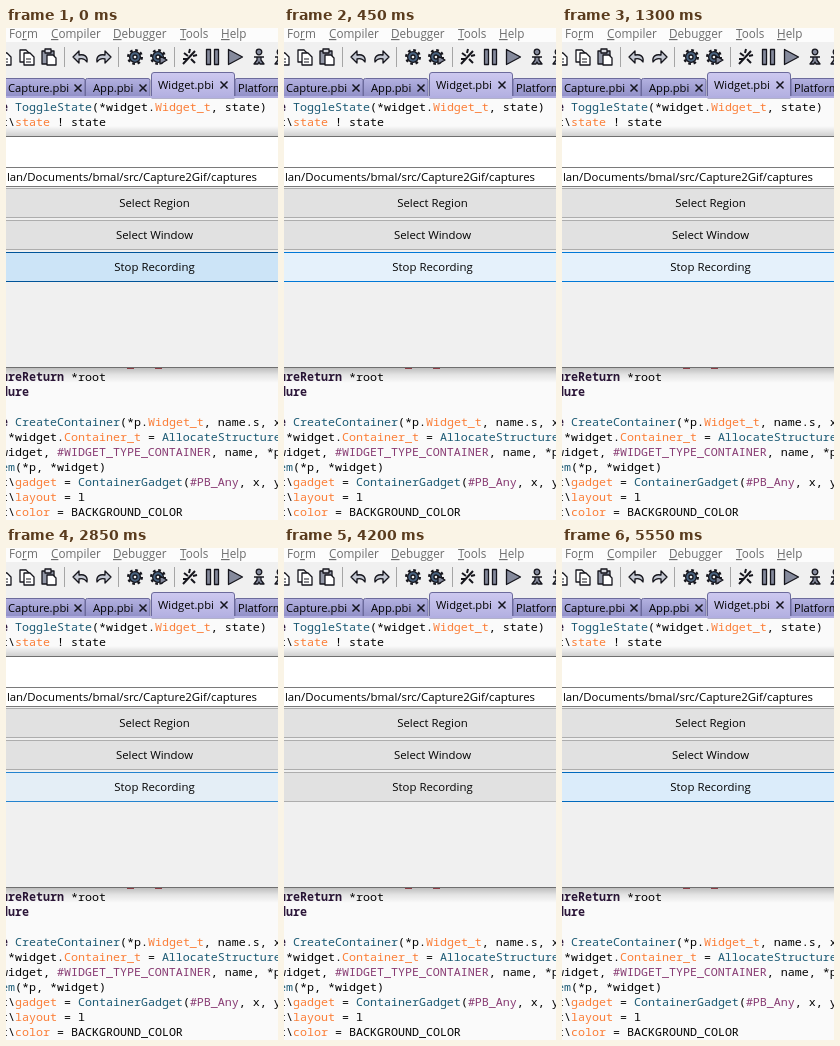
These frames come from a looping animation (272x492 px, 5700 ms). An HTML page:

```html
<!DOCTYPE html>
<html lang="en">
<head>
<meta charset="utf-8">
<title>Recorder window over a code editor</title>
<style>
  html, body { margin: 0; width: 100%; height: 100%; overflow: hidden; background: #fafafa; }
  svg { display: block; width: 100%; height: 100%; }
  text { white-space: pre; }
  .ui { font: 11.4px "Open Sans", "Noto Sans", sans-serif; fill: #000; }
  .menu { font-size: 11.7px; fill: #6d6d6d; }
  .menu tspan { text-decoration: underline; }
  .tabs { font-size: 11.2px; }
  .code { font: 11.667px "Noto Sans Mono", "DejaVu Sans Mono", monospace; fill: #000; }
  .key { font-weight: 700; fill: #2b1538; }
  .fn { fill: #1c5a74; }
  .type { fill: #fb7d36; }
  .const { fill: #873a72; }
  .mid { text-anchor: middle; }
  .button { fill: #e1e1e1; stroke: #adadad; }
  .icon { fill: none; stroke: #15151c; stroke-width: 1.3; stroke-linejoin: round; }
  .filled { fill: #858a9c; }

  #controls { animation: repaint 5.7s step-end infinite; }
  #stop { animation: press 5.7s step-end infinite; }

  @keyframes repaint {
    0%, 5.26% { visibility: visible; }
    3.505% { visibility: hidden; }
  }
  /* hover out, brief hover, hover out and in again, then the click */
  @keyframes press {
    0% { fill: #cce4f7; stroke: #005499; }
    3.505% { fill: #e5f1fb; stroke: #0078d7; }
    49.995% { fill: #e5f1fb; stroke: #0078d7; animation-timing-function: steps(5, start); }
    54.38%, 73.68% { fill: #e1e1e1; stroke: #adadad; }
    74.555% { fill: #e5f1fb; stroke: #0078d7; }
    78.065% { fill: #e5f1fb; stroke: #0078d7; animation-timing-function: steps(5, start); }
    82.45% { fill: #e1e1e1; stroke: #adadad; }
    84.205% { fill: #e1e1e1; stroke: #adadad; animation-timing-function: steps(5, start); }
    88.59% { fill: #e5f1fb; stroke: #0078d7; }
    96.485% { fill: #e1eefa; stroke: #0071cb; }
    97.36%, 100% { fill: #dbecfa; stroke: #0069bd; }
  }
</style>
</head>
<body>
<svg viewBox="0 0 272 492" preserveAspectRatio="none">
  <defs>
    <linearGradient id="below" x2="0" y2="1">
      <stop stop-color="#000" stop-opacity=".24"/>
      <stop offset=".45" stop-color="#000" stop-opacity=".09"/>
      <stop offset="1" stop-color="#000" stop-opacity="0"/>
    </linearGradient>
    <linearGradient id="above" y1="1" x2="0" y2="0">
      <stop stop-color="#000" stop-opacity=".17"/>
      <stop offset="1" stop-color="#000" stop-opacity="0"/>
    </linearGradient>
    <linearGradient id="tab" x2="0" y2="1">
      <stop stop-color="#b3b1e0"/>
      <stop offset="1" stop-color="#8f8ec6"/>
    </linearGradient>
    <linearGradient id="active" x2="0" y2="1">
      <stop stop-color="#cdc9f0"/>
      <stop offset="1" stop-color="#b2afe0"/>
    </linearGradient>
    <g id="gear" class="icon">
      <circle r="6.800" style="stroke-width:2.400;stroke-dasharray:2.670 2.670"/>
      <circle r="5.400" fill="#4b6480"/>
      <circle r="2" fill="#f0f0f0"/>
    </g>
    <g id="pages" class="icon">
      <path d="M1 1h6l3 3v9H1z" fill="#fff"/>
      <path d="M5 4h6l4 4v8H5z" fill="#fff"/>
      <path d="M7 10h5M7 13h5" stroke-width="1"/>
    </g>
    <path id="turn" class="icon filled" d="M0 9l6-6v4c5-1 9 1 8 7-2-3-4-4-8-3v4z" style="fill:#c4c8d2"/>
    <g id="figure" class="icon filled">
      <circle cy="-5" r="2.800"/>
      <path d="M-5 0h10M-2 0v3l-3 4h4l1-2 1 2h4l-3-4v-3z"/>
    </g>
    <path id="close" d="M-3.500-3.500l7 7m0-7l-7 7" stroke="#15151f" stroke-width="1.500"/>
  </defs>

  <rect width="272" height="492" fill="#fafafa"/>

  <!-- menu and toolbar -->
  <rect width="272" height="70" fill="#f0f0f0"/>
  <rect width="272" height="14" fill="#fcfcfc"/>
  <g class="ui menu">
    <text x="3" y="10">Fo<tspan>r</tspan>m</text>
    <text x="45" y="10"><tspan>C</tspan>ompiler</text>
    <text x="107" y="10"><tspan>D</tspan>ebugger</text>
    <text x="174" y="10"><tspan>T</tspan>ools</text>
    <text x="215" y="10"><tspan>H</tspan>elp</text>
  </g>
  <path d="M58.500 19v20M112.500 19v20M168.500 19v20" stroke="#a5a5a5"/>
  <use href="#pages" x="-10" y="21"/>
  <use href="#pages" x="13" y="21"/>
  <g class="icon">
    <path d="M36 23h12v13h-12z" fill="#9297a6"/>
    <path d="M39 21h6v4h-6z" fill="#d5d7de"/>
    <path d="M41 27h6l3 3v7h-9z" fill="#fff"/>
  </g>
  <use href="#turn" x="67" y="20"/>
  <use href="#turn" transform="translate(105 20) scale(-1 1)"/>
  <use href="#gear" x="129" y="29"/>
  <use href="#gear" x="152" y="29"/>
  <path class="icon filled" d="M154 28l7 4-7 4z"/>
  <path class="icon" style="stroke-width:2" d="M177 36l12-13M178 25l4 3M184 21l-1 4M185 31l4 4M177 31h4M187 28l4-1"/>
  <path class="icon filled" d="M200.500 21.500h4v15h-4zM208.500 21.500h4v15h-4zM222.500 21.500l14 7.500-14 7.500z"/>
  <use href="#figure" x="253" y="29"/>
  <use href="#figure" x="274" y="29"/>

  <!-- file tabs -->
  <g stroke="#6c6b9c">
    <path d="M-1 69V50.500H77q2 0 2 2V69zM79.500 69V52q0-1.500 2-1.500H142q2 0 2 2V69zM229 69V52q0-1.500 2-1.500H274V69z" fill="url(#tab)"/>
    <path d="M145.500 70V47q0-2.500 2.500-2.500H226q2.500 0 2.500 2.500V70z" fill="url(#active)"/>
  </g>
  <rect y="68" width="272" height="2" fill="#b2afe0"/>
  <g class="ui tabs">
    <text x="2" y="64">Capture.pbi</text>
    <text x="87" y="64">App.pbi</text>
    <text x="152" y="61">Widget.pbi</text>
    <text x="232" y="64">Platform.pbi</text>
  </g>
  <use href="#close" x="72" y="60"/>
  <use href="#close" x="137" y="60"/>
  <use href="#close" x="218" y="57"/>

  <!-- source code -->
  <g class="code">
    <text x="-5" y="83"><tspan class="key">e</tspan> <tspan class="fn">ToggleState</tspan>(*widget.<tspan class="type">Widget_t</tspan>, state)</text>
    <text x="-5" y="98">t\<tspan class="type">state</tspan> ! state</text>
    <path d="M121 340.500h7M149 340.500h7" stroke="#b5505a"/>
    <text x="-5" y="353"><tspan class="key">ureReturn</tspan> *root</text>
    <text x="-5" y="368" class="key">dure</text>
    <text x="-5" y="398"><tspan class="key">e</tspan> <tspan class="fn">CreateContainer</tspan>(*p.<tspan class="type">Widget_t</tspan>, name.s, x</text>
    <text x="2" y="413">*widget.<tspan class="type">Container_t</tspan> = <tspan class="fn">AllocateStructure</tspan></text>
    <text x="-5" y="428">widget, <tspan class="const">#WIDGET_TYPE_CONTAINER</tspan>, name, *p</text>
    <text x="-5" y="443"><tspan class="fn">em</tspan>(*p, *widget)</text>
    <text x="-5" y="458">t\<tspan class="type">gadget</tspan> = <tspan class="fn">ContainerGadget</tspan>(<tspan class="const">#PB_Any</tspan>, x, y</text>
    <text x="-5" y="473">t\<tspan class="type">layout</tspan> = l</text>
    <text x="-5" y="488">t\<tspan class="type">color</tspan> = BACKGROUND_COLOR</text>
  </g>

  <!-- recorder window -->
  <rect y="98" width="272" height="10" fill="url(#above)"/>
  <rect y="340" width="272" height="15" fill="url(#below)"/>
  <rect y="108" width="272" height="232" fill="#6f6f6f"/>
  <rect y="109" width="272" height="30" fill="#fff"/>
  <rect y="139" width="272" height="200" fill="#f0f0f0"/>
  <g id="controls" class="ui">
    <rect x="-5" y="139.500" width="285" height="19" fill="#fff" stroke="#7a7a7a"/>
    <text x="251" y="153" text-anchor="end">lan/Documents/bmal/src/Capture2Gif/captures</text>
    <rect class="button" x="-5" y="160.500" width="285" height="29"/>
    <rect class="button" x="-5" y="192.500" width="285" height="29"/>
    <rect class="button" id="stop" x="-5" y="224.500" width="285" height="29"/>
    <text class="mid" x="148.500" y="179">Select Region</text>
    <text class="mid" x="148.500" y="211">Select Window</text>
    <text class="mid" x="148.500" y="243">Stop Recording</text>
  </g>
</svg>
</body>
</html>
```
